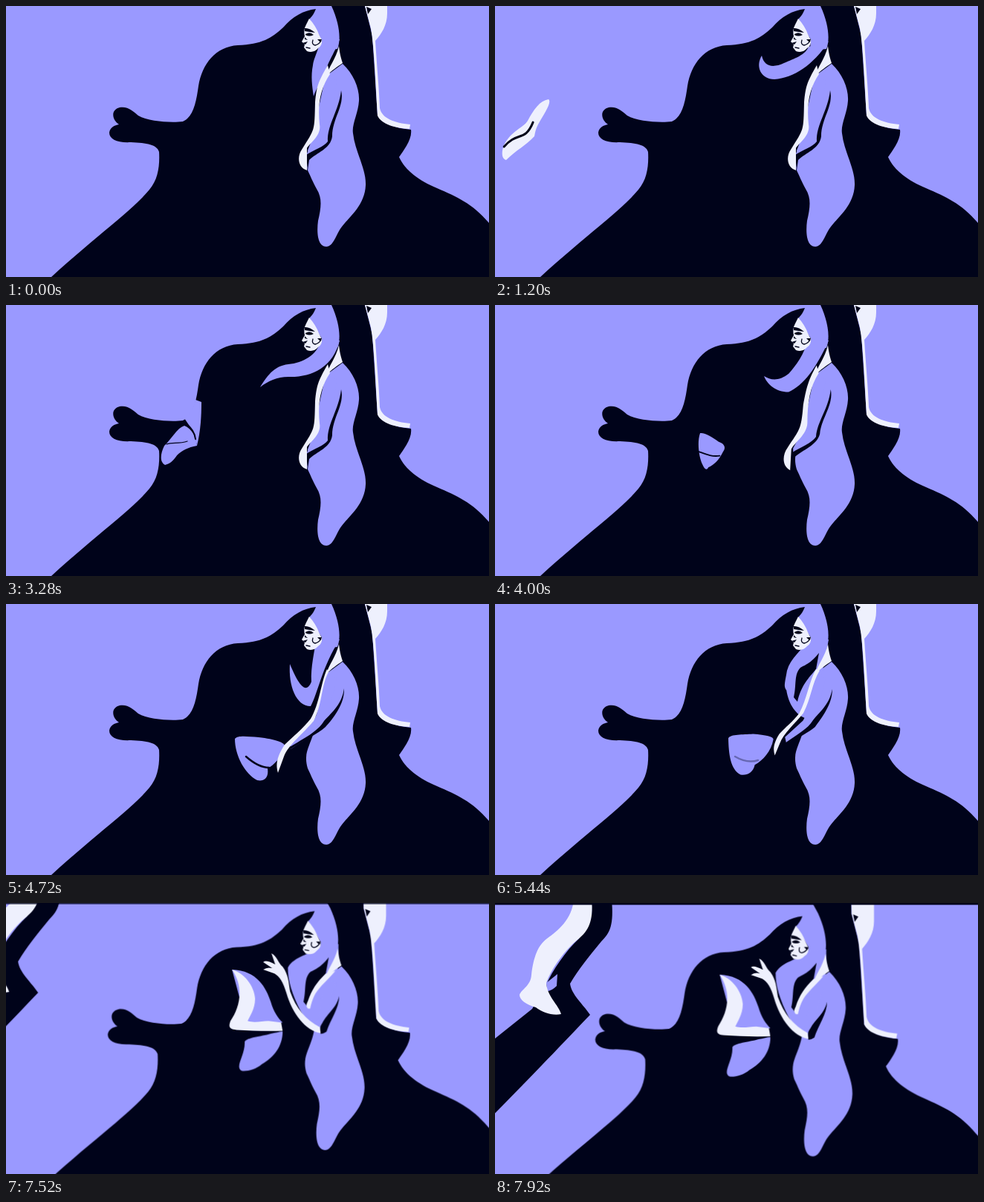
Animation, 650 px wide and 366 px high, one loop 8 s. Source, as an HTML page without scripts:

```html
<!DOCTYPE html>
<html lang="en">
<head>
<meta charset="utf-8">
<title>Shadow figures</title>
<style>
:root { --lilac: #9a99ff; --ink: #00031a; --pale: #eef0fd; }
html, body { margin: 0; width: 100%; height: 100%; overflow: hidden; background: var(--lilac); }
svg { display: block; width: 100vw; height: 100vh; }
path, rect { fill: var(--ink); }
.lilac { fill: var(--lilac); }
.pale { fill: var(--pale); }
.line { fill: none; stroke: var(--ink); stroke-width: 2; stroke-linecap: round; }
.move { animation: 8s linear infinite; }

#scene { animation-name: pan; }
@keyframes pan {
  0%, 89% { transform: matrix(1, 0, 0, 1, 0, 0); }
  99%, 100% { transform: matrix(1.003, .008, 0, 1.01, -4.5, 10.5); }
}

#lock { animation-name: lock; }
@keyframes lock {
  0%, 4% { d: path("M420 30C428 50 415 65 413 80C410 95 412 108 414 122C418 108 428 100 430 90C433 75 440 68 449 45Z"); }
  15% { d: path("M422 55C418 66 403 71 389 77C374 84 362 82 359 67C350 82 358 99 376 99C402 97 428 80 449 48Z"); }
  29% { d: path("M424 45C420 75 415 90 400 100C385 102 384 72 363 72C378 85 365 108 390 117C425 125 420 85 449 48Z"); }
  41% { d: path("M424 48C418 68 400 78 380 80C360 82 350 98 342 111C352 103 365 97 380 97C410 98 440 85 449 48Z"); }
  59% { d: path("M418 45C415 65 410 85 411 105C403 125 392 105 382 81C380 110 390 138 410 138C420 120 425 85 449 48Z"); }
  74%, 100% { d: path("M424 50C410 64 390 64 381 80C381 97 386 115 399 140C405 152 415 158 425 166C440 140 449 110 449 48Z"); }
}

#forearm { animation-name: forearm; }
@keyframes forearm {
  0%, 48% { d: path("M432 95C424 130 420 140 421 160L406 195L406 203C420 195 430 190 434 180L445 100Z"); }
  58%, 66% { d: path("M432 95C424 130 425 140 412 160L382 188L383 196C405 182 425 170 432 155L445 100Z"); }
  74%, 100% { d: path("M432 95C424 120 425 140 422 150L415 155L418 160C422 163 426 160 430 155L445 100Z"); }
}

#slit { animation-name: slit; }
@keyframes slit {
  0%, 48% { d: path("M451 114C456 135 439 152 439 176C437 193 418 198 408 208L406 222L404 201C415 194 428 190 433 183C432 160 448 142 451 114Z"); }
  58%, 66% { d: path("M455 114C456 135 440 155 430 166C420 175 400 185 383 196L381 196L382 193C400 182 420 172 428 158C440 145 452 135 455 114Z"); }
  74%, 100% { d: path("M450 118C450 135 438 150 433 166C430 168 428 169 425 169L425 169L424 166C424 160 425 158 427 155C435 140 446 135 450 118Z"); }
}

#arm { animation-name: arm; }
@keyframes arm {
  0%, 48% { d: path("M433 80C419 104 418 110 416 130C415 170 416 165 398 194C392 202 392 218 405 222L405 192C408 186 425 175 422 160C419 130 424 110 436 92Z"); }
  58%, 66% { d: path("M432 88C424 105 422 135 410 155C400 168 385 180 375 190C366 204 362 215 366 228L374 206C380 190 400 175 414 158C426 135 424 110 434 92Z"); }
  74%, 100% { d: path("M432 88C420 99 413 110 408 125C407 127 406 129 406 131C406 132 407 134 408 135L411 135C412 130 414 122 418 115C424 105 434 97 445 84Z"); }
}

#blob { animation-name: blob; }
@keyframes blob {
  0%, 4% { transform: translate(-90px, 60px); }
  0%, 15% { d: path("M72 126C77 130 66 146 58 160C54 168 54 172 53 176C42 188 28 195 15 208C8 206 9 196 12 188C22 168 38 165 44 155C52 140 60 128 72 126Z"); }
  15%, 100% { transform: translate(0, 0); }
  27%, 30% { d: path("M170 190C182 189 192 195 192 205C192 218 182 228 166 231C160 234 150 235 142 234C138 228 142 218 148 208C155 200 162 193 170 190Z"); }
  0%, 35% { fill: var(--pale); }
  40%, 100% { fill: var(--lilac); }
  41% { d: path("M240 163C250 167 256 178 257 190C245 192 236 197 230 203C224 212 220 214 214 216C206 212 208 200 213 190C222 182 230 166 240 163Z"); }
  58%, 64% { d: path("M308 182C312 177 325 179 340 180C365 183 378 188 375 194C370 208 360 218 352 222C354 235 347 240 338 238C322 230 308 205 308 182Z"); }
  74%, 100% { d: path("M323 180C326 174 345 173 358 169C364 168 370 166 374 166C374 186 362 201 346 210C338 217 326 220 319 219C309 214 324 198 323 180Z"); }
}

#crease { animation-name: crease; }
@keyframes crease {
  0%, 4% { transform: translate(-90px, 60px); }
  0%, 15% { d: path("M12 190C30 169 40 184 51 157"); stroke-width: 3; }
  15%, 100% { transform: translate(0, 0); }
  27%, 30% { d: path("M167 208C169 215 169 222 167 231"); stroke-width: 2.5; }
  41% { d: path("M216 188C224 185 232 188 244 184"); stroke-width: 1.2; }
  58%, 64% { d: path("M323 206C332 214 342 221 354 221"); stroke-width: 2.5; opacity: 1; }
  70%, 100% { d: path("M323 206C332 210 342 212 354 206"); opacity: 0; }
}

#paw, #notch, #lobe { animation-timing-function: step-end; }
#paw { animation-name: paw; }
@keyframes paw { 0%, 34% { opacity: 0; } 26% { opacity: 1; } }
#notch { animation-name: notch; }
@keyframes notch { 0%, 45% { opacity: 0; } 38% { opacity: 1; } }
#lobe { animation-name: lobe; }
@keyframes lobe { 0% { opacity: 0; } 68%, 100% { opacity: 1; } }

#knee { animation-name: knee; transform-origin: 374px 160px; }
@keyframes knee {
  0%, 68% { transform: scale(0); }
  74%, 100% { transform: scale(1); }
}

#reach { animation-name: reach; transform-origin: 425px 165px; }
@keyframes reach {
  0%, 68.9% { transform: rotate(-50deg); opacity: 0; }
  69% { transform: rotate(-50deg); opacity: 1; }
  74%, 100% { transform: rotate(0deg); opacity: 1; }
}

#walker { animation-name: walk; }
@keyframes walk {
  0%, 89% { transform: translate(-170px, -60px); }
  99%, 100% { transform: translate(0, 0); }
}
#bar { animation-name: bar; }
@keyframes bar {
  0%, 89% { transform: translateY(-3px); }
  99%, 100% { transform: translateY(0); }
}
</style>
</head>
<body>
<svg viewBox="0 0 650 366" preserveAspectRatio="none">
  <g id="scene" class="move">
    <!-- body, standing leg and ground -->
    <path d="M-10 430L61 366C120 312 170 276 193 248C205 234 207 215 206 197C203 187 190 185 168 184C150 185 139 180 139 171C140 164 146 161 152 160C142 153 141 140 153 137C164 135 171 142 178 148C192 156 222 158 238 156C252 150 256 130 259 108C264 78 282 55 312 53C344 52 358 43 373 29C386 14 400 6 417 4C414 12 410 16 408 18L425 45L424 60L446 58C451 45 449 24 438 0L428 -18L420 -50L481 -50L483 0L493 40L500 148C508 160 525 165 545 167C547 180 535 195 529 204C537 222 556 236 580 246C607 258 627 266 650 293L700 345L700 430Z"/>
    <!-- torso -->
    <path class="lilac" d="M453 78C468 92 476 112 475 128C474 145 465 160 467 172C470 198 485 220 484 242C483 268 464 283 452 298C444 308 441 325 431 325C419 325 418 305 420 290C424 272 426 260 418 247C412 236 410 230 406 222C398 195 416 188 418 150L430 95Z"/>
    <path id="lock" class="lilac move"/>
    <path id="blob" class="move"/>
    <path id="crease" class="line move"/>
    <g id="paw" class="move">
      <path d="M166 191L186 180L194 184L180 193Z"/>
      <path class="pale" d="M191 180C197 174 204 171 211 170C208 176 200 178 191 180Z"/>
      <path class="lilac" d="M190 191C197 186 204 187 206 196C207 212 202 232 193 246C186 252 177 247 182 236C194 222 195 204 190 191Z"/>
    </g>
    <g id="notch" class="move">
      <path class="lilac" d="M240 153C248 148 252 140 255 128L263 131C263 150 262 170 257 190L254 175C250 168 245 160 240 153Z"/>
      <path class="line" d="M242 160C250 166 254 172 255 181"/>
    </g>
    <path id="forearm" class="lilac move"/>
    <path id="slit" class="move"/>
    <path id="lobe" class="move" d="M436 66C425 80 418 82 411 86C402 95 406 110 402 126L407 132C412 110 422 100 432 88Z"/>
    <path id="arm" class="pale move"/>
    <path class="pale" d="M448 54C444 72 434 82 431 95C438 87 446 82 453 77C450 68 449 62 448 54Z"/>
    <g id="knee" class="move">
      <path class="lilac" d="M306 83C340 84 352 108 358 126C362 140 368 148 374 154L350 157L325 154Z"/>
      <path class="pale" d="M306 83C322 87 336 105 337 122C337 136 329 147 327 152C336 155 346 152 355 152L372 154L374 165C355 166 332 165 312 164C302 163 301 160 304 152C316 134 323 108 306 83Z"/>
    </g>
    <path id="reach" class="pale move" d="M425 168C405 165 387 142 379 114C375 100 370 92 363 88L348 83Q353 79 360 81L348 73Q351 69 364 76L359 61C366 64 368 74 374 79C382 90 382 100 384 112C392 135 405 150 424 160Z"/>
    <!-- face -->
    <path class="pale" d="M408 17Q417 27 421 38L425 46Q426 53 420 57Q414 64 405 61L401 56L402 52L398 48L402 41Q400 32 404 25Z"/>
    <path d="M402 30Q408 29 416 36Q408 35 402 34ZM403 38Q409 34 414 39Q408 42 403 39ZM399 50L406 48L403 52ZM402 42L406 46L402 45ZM419 45L425 45L423 49Z"/>
    <path class="line" style="stroke-width:1.3" d="M413 46Q411 52 416 53Q421 52 424 47M404 56L409 57"/>
    <!-- lit edge of the standing leg -->
    <path class="pale" d="M483 -20L513 -20L513 10C513 26 505 38 497 47C499 80 502 110 503 138C506 152 523 158 544 160L543 166C525 165 505 160 500 148C497 100 496 60 491 30L483 0Z"/>
    <path d="M485 1L492 4L487 11Z"/>
  </g>
  <g id="walker" class="move">
    <path d="M130 -5L157 -5C160 30 155 40 143 52C125 74 112 90 101 109C103 124 118 136 128 151C108 172 57 226 0 284L0 183L50 143L68 112C78 90 95 65 113 48Z"/>
    <path class="lilac" d="M84 96L83 112Q76 119 70 119L69 108Z"/>
    <path class="pale" d="M106 -5L130 -5C133 25 125 38 113 48C95 62 76 88 69 108C70 126 86 138 89 150C78 153 62 147 55 141C42 137 33 131 33 124C36 116 48 112 49 97C52 72 58 57 70 48C84 38 104 22 106 -5Z"/>
  </g>
  <rect id="bar" class="move" width="650" height="2.5"/>
</svg>
</body>
</html>
```
